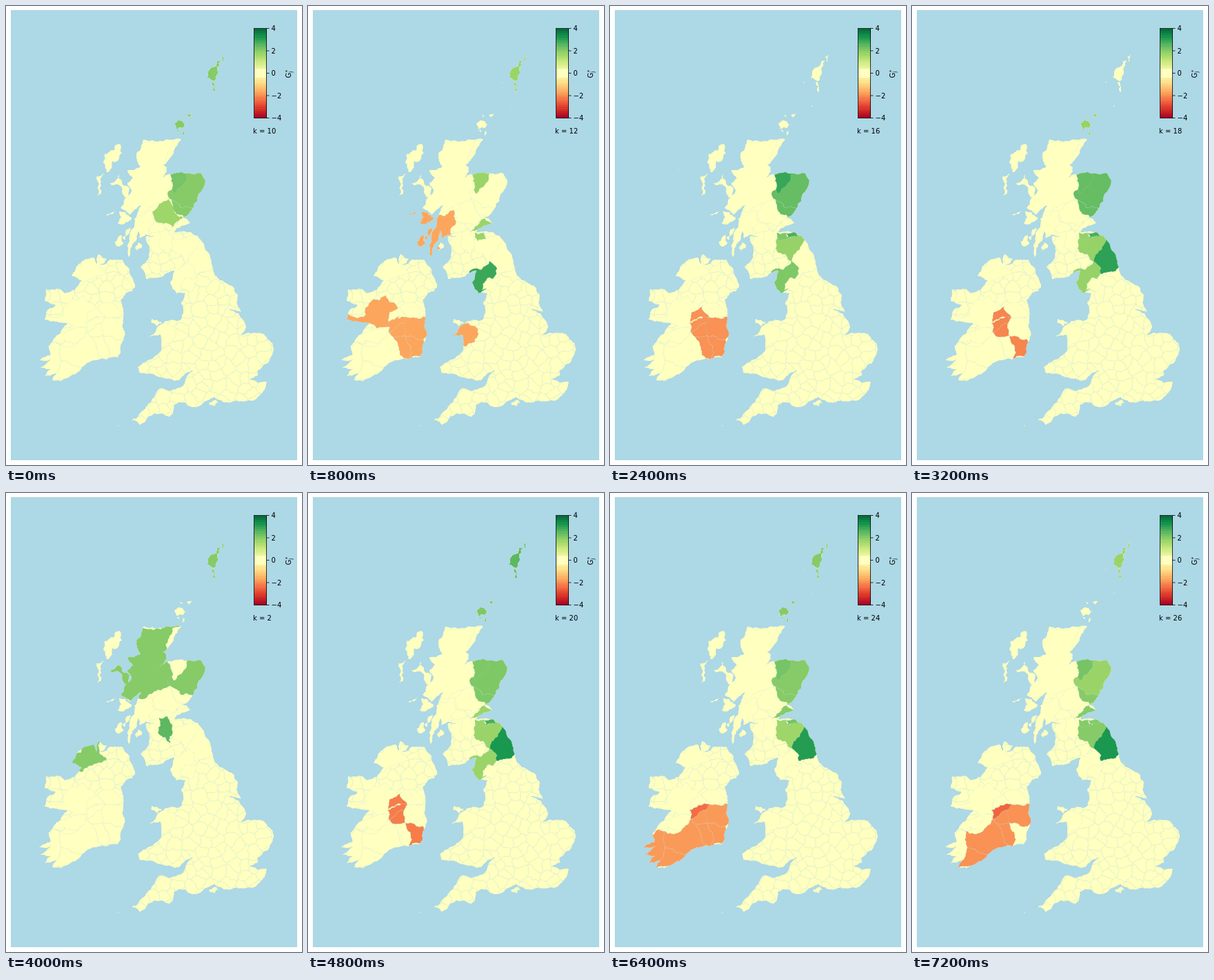
Animation, 429 px wide and 666 px high, one loop 8000 ms. Source, as an HTML page:

```html
<!DOCTYPE html>
<html lang="en">
<head>
<meta charset="utf-8">
<title>Hot spots by k</title>
<style>
  html, body { margin: 0; width: 100%; height: 100%; overflow: hidden; background: #fff; }
  svg { display: block; width: 429px; height: 666px; }
  text { font: 10px "DejaVu Sans", sans-serif; }
  .small { font-size: 7px; }
  .edge { stroke: #add8e6; stroke-opacity: .4; stroke-width: .5; }
</style>
</head>
<body>
<svg viewBox="0 0 429 666">
  <defs><clipPath id="coast"><path id="shore"/></clipPath></defs>
  <rect x="7" y="6" width="415" height="653" fill="#add8e6"/>
  <path id="land" fill="#ffffbf"/>
  <g clip-path="url(#coast)">
    <path id="mesh" class="edge" fill="none"/>
    <g id="areas"></g>
  </g>
  <g id="bar"></g>
  <text id="label" x="358" y="185"></text>
  <g transform="translate(412.5 104.5) rotate(-90)" font-style="italic">
    <text>G</text>
    <text class="small" x="7.8" y="2">j</text>
    <text class="small" x="8.2" y="-3">*</text>
  </g>
</svg>
<script>
const $ = id => document.getElementById(id);
const add = (parent, tag, attrs) => {
  const el = document.createElementNS('http://www.w3.org/2000/svg', tag);
  for (const k in attrs) el.setAttribute(k, attrs[k]);
  return parent.appendChild(el);
};
const pts = s => {
  const n = s.trim().split(/\s+/).map(Number);
  return n.filter((_, i) => i % 2 === 0).map((x, i) => [x, n[2 * i + 1]]);
};

// Red-yellow-green scale on -4..4, flat around zero
const ramp = '#a50026 #d73027 #f46d43 #fdae61 #fee08b #ffffbf #d9ef8b #a6d96a #66bd63 #1a9850 #006837'.split(' ');
const rgb = h => [1, 3, 5].map(i => parseInt(h.slice(i, i + 2), 16));
const color = v => {
  const t = Math.abs(v) < .45 ? 5 : (v + 4) / .8, i = Math.min(9, Math.floor(t));
  const a = rgb(ramp[i]), b = rgb(ramp[i + 1]);
  return `rgb(${a.map((c, k) => Math.round(c + (b[k] - c) * (t - i)))})`;
};

// Jagged line between two points; the same whichever end comes first
const noise = (x, y) => {
  const s = Math.sin(Math.round(x) * 12.99 + Math.round(y) * 78.23) * 43758.5;
  return s - Math.floor(s) - .5;
};
const jag = (a, b, amp) => {
  const dx = b[0] - a[0], dy = b[1] - a[1];
  if (Math.hypot(dx, dy) < 3) return [a];
  const mx = (a[0] + b[0]) / 2, my = (a[1] + b[1]) / 2;
  const o = noise(mx, my) * amp * (dx < 0 || (dx === 0 && dy < 0) ? -1 : 1);
  const m = [mx - dy * o, my + dx * o];
  return [...jag(a, m, amp), ...jag(m, b, amp)];
};
const outline = (p, amp) =>
  'M' + p.flatMap((a, i) => jag(a, p[(i + 1) % p.length], amp))
         .map(q => q.map(c => c.toFixed(1)).join(' ')).join('L') + 'Z';
const isle = s => outline(pts(s), .5);

const northEast = `254 193 243 213 226 231 233 234 221 254 243 243 283 243 289 253 281 271 270 294 256 306
  268 315 244 328 269 329 283 341 294 359 300 383 309 397 321 403 336 420 334 430 342 446 322 440 337 446`;
const southEast = `348 466 340 477 351 474 374 476 386 489 382 514 364 530 365 536 349 542 378 546 375 557
  365 567 345 574 316 575 302 567 284 578 270 582 259 575 243 579 237 596 215 591 205 597 194 608`;
const southWest = `186 601 180 603 197 588 212 570 222 555 254 553 271 529 250 543 234 541 218 537 193 532
  191 524 208 513 225 499 224 477 206 482 219 467 231 457 247 457 255 453 254 430`;
const northWest = `260 417 247 417 238 402 244 384 238 385 216 394 203 396 195 378 208 358 203 334 215 334
  203 331 194 337 192 326 188 341 178 364 179 333 186 309 196 289 179 303 166 293 182 269 176 257 184 250
  176 239 195 233 189 214 199 194 226 196`;
const irishEast = `134 360 146 367 137 376 168 368 180 390 187 407 183 414 175 416 166 427 170 455 172 474
  166 492 162 510 146 513 128 514 109 526 90 539`;
const irishWest = `67 543 73 533 56 537 70 525 50 525 66 512 48 514 65 506 62 493 96 488 64 491 78 476
  89 461 56 455 60 441 72 434 56 428 58 411 79 411 85 417 100 412 110 399 95 392 109 372 127 365 131 375`;

const lewis = isle('165 200 168 214 146 241 141 227 143 215');
const uist = isle('131 247 143 244 138 272 132 275');
const skye = isle('163 243 168 257 179 265 172 278 168 268 150 257');
const mull = isle('164 298 172 299 182 307 177 313 162 315');
const islay = isle('168 333 170 344 164 349 158 342');
const jura = isle('180 322 173 339 169 336');
const arran = isle('192 343 197 350 190 355');
const tiree = isle('158 295 152 302 145 304');
const anglesey = isle('211 454 226 459 219 465 211 460');
const wight = isle('294 577 302 572 308 576 302 581');
const dots = isle('100 236 101 236 101 237') + isle('162 608 164 609 163 610');

const orkney = isle('244 171 252 166 263 173 247 178') + isle('244 178 251 181 251 185') +
  isle('256 181 259 182 256 188') + isle('249 156 257 160 254 161') + isle('262 159 272 152 265 162');
const shetland = isle('299 89 306 87 307 98 302 126 301 109 291 104 293 98') +
  isle('306 80 311 79 308 92') + isle('312 74 317 71 315 81') +
  isle('280 110 282 111 281 112') + isle('292 144 294 145 293 146');

const shore = outline(pts([northEast, southEast, southWest, northWest].join(' ')), .28) +
  outline(pts(irishEast + ' ' + irishWest), .28) +
  lewis + uist + skye + mull + islay + jura + arran + tiree + anglesey + wight + dots + orkney + shetland;
$('shore').setAttribute('d', shore);
$('land').setAttribute('d', shore);

// County mesh: nearest-centre cells of a shaken lattice
const gap = 16, seeds = [];
for (let x = 40; x < 400; x += gap)
  for (let y = 345; y < 620; y += gap)
    seeds.push([x + noise(x, y) * gap, y + noise(y, x) * gap]);
const cell = ([x, y]) => {
  let poly = [[x - 40, y - 40], [x + 40, y - 40], [x + 40, y + 40], [x - 40, y + 40]];
  for (const [u, v] of seeds) {
    const far = Math.hypot(u - x, v - y);
    if (far === 0 || far > 60) continue;
    const side = p => (p[0] - (x + u) / 2) * (u - x) + (p[1] - (y + v) / 2) * (v - y);
    poly = poly.flatMap((p, i) => {
      const q = poly[(i + 1) % poly.length], a = side(p), b = side(q), t = a / (a - b);
      const cut = a * b < 0 ? [[p[0] + (q[0] - p[0]) * t, p[1] + (q[1] - p[1]) * t]] : [];
      return a <= 0 ? [p, ...cut] : cut;
    });
  }
  return poly;
};
$('mesh').setAttribute('d', seeds.map(s => outline(cell(s), .4)).join(''));

// Later areas cover the overlap of earlier ones
const area = {};
const region = (name, s) => {
  area[name] = add($('areas'), 'path', { d: outline(pts(s), .4), class: 'edge' });
};
region('high', '190 190 258 188 234 246 243 270 232 284 190 298 172 298 155 285 150 250 170 225');
region('perth', '237 278 256 306 241 321 220 314 208 298 222 287');
region('aber', '250 238 295 238 290 275 270 294 240 281 234 272');
region('moray', '234 238 262 238 262 250 255 262 243 272 242 260');
region('angus', '240 281 270 294 276 300 262 309 247 302');
region('stir', '208 301 232 320 230 328 211 328 204 318');
region('fife', '234 328 256 308 272 314 255 326');
region('argyll', '141 300 163 294 180 305 211 296 208 331 190 339 184 364 155 352');
region('lanark', '222 326 234 324 243 345 238 363 220 348');
region('bord', '243 330 262 336 272 328 285 336 277 350 264 372 240 352');
region('mid', '242 329 255 329 258 338 246 341');
region('elo', '255 329 272 326 271 335 258 337');
region('north', '283 338 302 340 302 378 286 386 266 386 264 372 277 348');
region('cumb', '234 385 264 370 274 380 270 393 247 419 230 405');
region('lanc', '259 396 277 393 268 415 252 412');
region('gwyn', '203 486 222 461 232 459 247 475 228 494');
region('ards', '176 398 184 390 190 412');
region('doneg', '90 390 120 358 140 354 136 379 146 386 112 404');
region('west', '50 444 84 448 92 428 113 420 144 446 117 466 104 470 84 460 50 459');
region('wmeath', '119 444 134 435 144 452 116 458');
region('meath', '134 435 148 431 174 442 166 452 144 452');
region('offaly', '115 460 144 452 145 462 117 474');
region('laois', '117 474 145 462 141 478 123 480');
region('kild', '144 452 176 450 176 478 167 484 141 478');
region('wex', '141 478 167 484 172 512 146 513 148 492');
region('kilk', '123 480 141 478 148 492 146 513 133 506');
region('tipp', '78 491 104 489 117 474 123 480 133 506 146 513 118 530 80 514');
region('cork', '80 514 118 530 105 545 60 548');
region('kerry', '78 491 80 514 60 548 42 545 42 500');
region('clare', '72 474 117 470 104 489 58 497');
area.ork = add($('areas'), 'path', { d: orkney });
area.shet = add($('areas'), 'path', { d: shetland });

const steps = [];
const step = (k, ...groups) => {
  const vals = {};
  for (const g of groups) {
    const [v, ...names] = g.split(' ');
    for (const n of names) vals[n] = +v;
  }
  steps.push({ k, vals });
};
step(10, '2 shet ork aber angus', '2.2 moray', '1.7 perth');
step(12, '1.75 shet moray fife mid', '2.85 cumb', '-1.7 argyll gwyn west offaly laois kild kilk wex');
step(14, '1.7 shet bord', '2.2 moray aber angus elo mid', '2.5 cumb',
  '-1.8 west wmeath offaly laois kild kilk wex');
step(16, '2.9 moray', '2.4 aber angus', '2.7 elo', '2.1 mid cumb', '1.8 bord',
  '-1.95 wmeath offaly laois kild kilk wex');
step(18, '1.8 ork bord mid cumb', '2.4 moray aber angus', '2.7 elo', '3 north', '-2.1 wmeath offaly laois wex');
step(2, '2 shet high aber doneg', '2.5 lanark');
step(20, '2.5 shet', '2.1 ork moray aber angus', '1.75 fife bord mid cumb', '2.7 elo', '3.2 north',
  '-2.2 wmeath offaly laois wex');
step(22, '2.4 shet aber fife elo', '2 ork moray', '1.75 angus stir lanc', '3 north', '-2.3 offaly laois wex',
  '-1.7 ards meath wmeath kild kilk tipp cork kerry clare');
step(24, '2 shet ork aber angus fife', '2.2 moray elo', '1.7 bord mid', '3.1 north', '-2.4 offaly',
  '-1.85 laois wex kild kilk tipp cork kerry');
step(26, '1.75 shet aber', '2.2 moray', '2 angus fife elo mid bord', '3.2 north', '-2.5 offaly',
  '-1.95 laois kild kilk tipp cork');

const bar = $('bar');
const box = { x: 359.5, y: 32.5, width: 18, height: 130 }, band = box.height / 40;
for (let i = 0; i < 40; i++)
  add(bar, 'rect', { ...box, y: box.y + i * band, height: band, fill: color(3.9 - i * .2),
                     'shape-rendering': 'crispEdges' });
add(bar, 'rect', { ...box, fill: 'none', stroke: '#000', 'stroke-width': .8 });
for (let v = 4; v >= -4; v -= 2) {
  const y = 97.5 - v * 16.25;
  add(bar, 'path', { d: `M378 ${y}h3.5`, stroke: '#000', 'stroke-width': .8 });
  add(bar, 'text', { x: 384.5, y: y + 3.7 }).textContent = v < 0 ? '−' + -v : v;
}

let shown = -1;
const draw = () => {
  const i = Math.floor(performance.now() / 800) % steps.length;
  if (i !== shown) {
    shown = i;
    const { k, vals } = steps[i];
    for (const a in area) area[a].setAttribute('fill', color(vals[a] || 0));
    $('label').textContent = 'k = ' + k;
  }
  requestAnimationFrame(draw);
};
draw();
</script>
</body>
</html>
```
